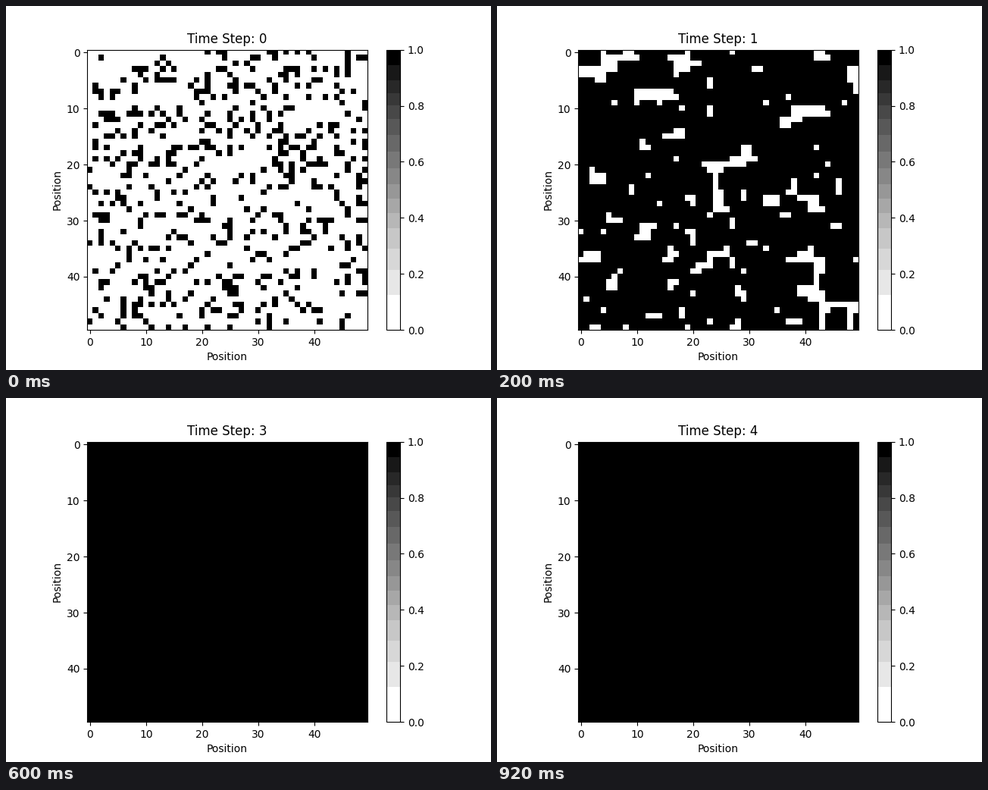
Write a matplotlib script that moves like this. It is 640 by 480 pixels and loops after 1 s.

```python
import matplotlib.pyplot as plt
import numpy as np
from matplotlib.animation import FuncAnimation
from matplotlib.colors import ListedColormap

SIZE = 50
STEPS = 5
DENSITY = 0.215
LAST_OPEN = [(2, 5), (2, 18)]  # row, column of the cells that fill last


def grow(cells):
    """Fill every cell with a live cell in its 3 x 3 neighbourhood, wrapping."""
    shifts = (-1, 0, 1)
    return np.logical_or.reduce([
        np.roll(cells, (dr, dc), axis=(0, 1)) for dr in shifts for dc in shifts
    ])


def mark(points):
    cells = np.zeros((SIZE, SIZE), dtype=bool)
    for row, col in points:
        cells[row, col] = True
    return cells


def initial_cells():
    rng = np.random.default_rng(7)
    last = mark(LAST_OPEN)
    allowed = ~grow(grow(last))
    cells = allowed & (rng.random((SIZE, SIZE)) < DENSITY)

    # Seed near any other cell that two growth steps would not reach.
    while (late := ~(grow(grow(cells)) | last)).any():
        nearby = grow(grow(mark([np.argwhere(late)[0]]))) & allowed
        row, col = rng.choice(np.argwhere(nearby))
        cells[row, col] = True
    return cells


def banded_greys(levels=16):
    grey = plt.get_cmap("Greys")(np.arange(256))[:, 0] * 255
    band = grey.astype(int) // (256 // levels)
    shade = (band + 0.5) / levels
    shade[band == 0] = 0
    shade[band == levels - 1] = 1
    return ListedColormap(np.column_stack([shade] * 3))


history = [initial_cells()]
for _ in range(STEPS - 1):
    history.append(grow(history[-1]))

fig, ax = plt.subplots(figsize=(6.4, 4.8), dpi=100)
image = ax.imshow(history[0].astype(float), cmap=banded_greys(),
                  vmin=0, vmax=1, interpolation="nearest")
fig.colorbar(image, ax=ax)
ax.set_xlabel("Position")
ax.set_ylabel("Position")
title = ax.set_title("Time Step: 0")


def update(step):
    image.set_data(history[step].astype(float))
    title.set_text(f"Time Step: {step}")
    return image, title


animation = FuncAnimation(fig, update, frames=STEPS, interval=200,
                          repeat=True, repeat_delay=0)
plt.show()
```
